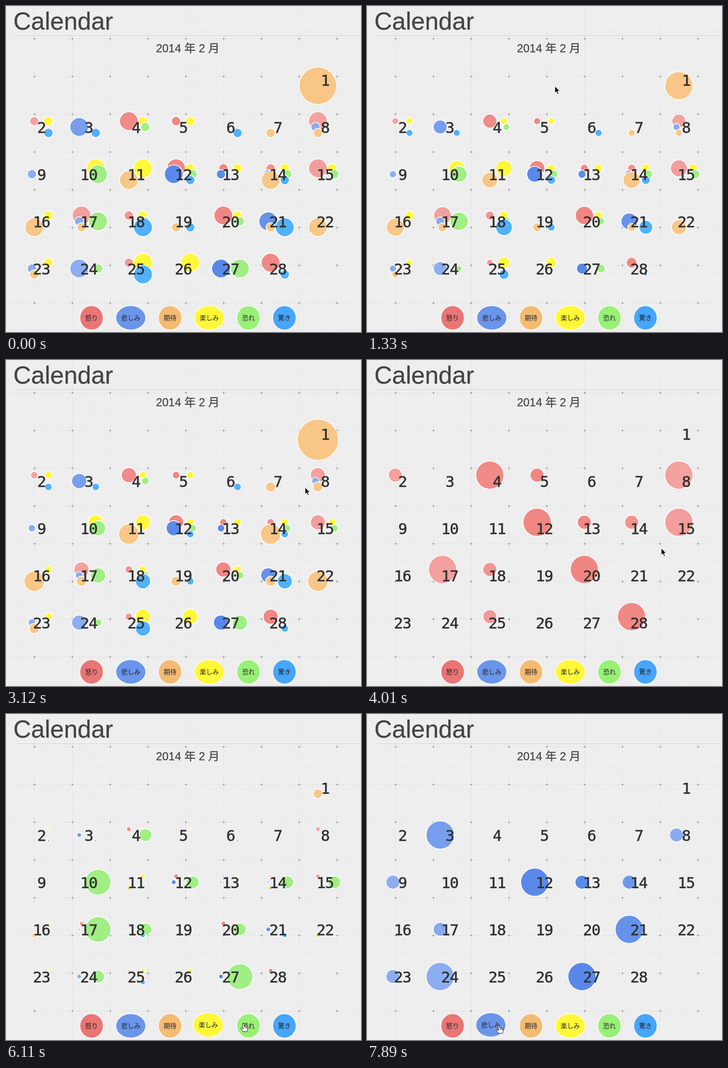
An HTML page for the animation above (8 s loop, 751 px wide and 691 px high).

```html
<!DOCTYPE html>
<html lang="ja">
<head>
<meta charset="utf-8">
<title>Calendar</title>
<style>
html, body { margin: 0; width: 100%; height: 100%; overflow: hidden; background: #fff; }
svg { display: block; }
text { font-family: "Liberation Sans", "Noto Sans CJK JP", "Noto Sans CJK", sans-serif; fill: #444; stroke: #444; stroke-width: .3; }
.mid { text-anchor: middle; }
.day { font: 32px "DejaVu Sans Mono", monospace; letter-spacing: -1.2px; fill: #303030; stroke: #303030; stroke-width: .6; }
.key { font-size: 13.5px; fill: #222; stroke: none; }
</style>
</head>
<body>
<svg width="751" height="691" viewBox="0 0 751 691">
  <defs>
    <pattern id="fine" width="4" height="4" patternUnits="userSpaceOnUse">
      <path d="M.5 0V4M0 1.5H4" stroke="#e9e9e9"/>
    </pattern>
    <pattern id="paper" width="80" height="80" x="60" y="69" patternUnits="userSpaceOnUse">
      <path d="M20.5 0V80M40.5 0V80M60.5 0V80M0 20.5H80M0 40.5H80M0 60.5H80" stroke="#e6e6e6"/>
      <path d="M.5 0V80M0 .5H80" stroke="#dfdfdf"/>
      <path d="M.5 0V3M.5 78V80M0 .5H3M78 .5H80" stroke="#8a8a8a"/>
    </pattern>
    <clipPath id="area"><rect x="35" y="119" width="716" height="500"/></clipPath>
  </defs>
  <g id="page">
    <rect width="751" height="691" fill="#f2f2f2"/>
    <rect width="751" height="691" fill="url(#fine)"/>
    <rect width="751" height="691" fill="url(#paper)"/>
    <text x="15.5" y="50" font-size="52">Calendar</text>
    <path d="M16 63.5H751" stroke="#c8c8c8"/>
    <path d="M16 64.5H751" stroke="#fff"/>
    <text class="mid" x="384.5" y="98" font-size="24">2014 年 2 月</text>
    <g id="dots" clip-path="url(#area)" stroke="#fff" stroke-width="1.6"></g>
    <g id="days"></g>
    <g id="keys"></g>
  </g>
  <g id="cursor">
    <path id="arrow" d="M0 0V14.5L3.4 11.4L5.8 17L8.2 16L5.8 10.6H10.4Z" fill="#000" stroke="#fff"/>
    <path id="hand" d="M-1.5 1Q0 -1 1.5 1L2.5 6Q4 4.5 5 6Q6.5 5 7.5 6.5Q9.5 6 9.7 8.5L9.5 13L8 17H0L-5 10.5Q-5 8 -2.5 9.5L0 11Z M3.2 7V10M5.8 7V10M8 8V10" fill="#fff" stroke="#111" stroke-linejoin="round"/>
  </g>
</svg>
<script>
const $ = id => document.getElementById(id);
function add(parent, tag, attrs, text) {
  const el = document.createElementNS("http://www.w3.org/2000/svg", tag);
  for (const k in attrs) el.setAttribute(k, attrs[k]);
  if (text) el.textContent = text;
  return parent.appendChild(el);
}

// Some dot colours deepen with the tone of the day (0 to 1)
const moods = [
  { id: "a", name: "怒り", key: "#e97575", dot: tone => `hsl(2 78% ${79.5 - 7 * tone}%)` },
  { id: "s", name: "悲しみ", key: "#6b95ea", dot: tone => `hsl(220 76% ${75 - 12 * tone}%)` },
  { id: "o", name: "期待", key: "#f5bb73", dot: () => "#f8c787" },
  { id: "j", name: "楽しみ", key: "#fff738", dot: () => "#fff73a" },
  { id: "f", name: "恐れ", key: "#99f077", dot: () => "#a0ee84" },
  { id: "u", name: "驚き", key: "#47a5fb", dot: () => "#51b1fc" }
];
// One word per day: a capital is a strong mood, a plus doubles it
const month = ("O+ aju Su Ajf aj u o Aso s JF OJ ASjfu asj asOjfu Ajf Oj AsoF ajfU ou Ajf SoU O soj Sf aJU J SF Au").split(" ");

const dots = [];
month.forEach((word, i) => {
  const day = i + 1, cell = i + 6;
  const x = 75 + cell % 7 * 100, y = 157 + Math.floor(cell / 7) * 100;
  const tone = .5 + .5 * Math.cos((day - 5) / 7.4 * 2 * Math.PI);
  for (const [, letter, plus] of word.matchAll(/([a-z])(\+?)/gi)) {
    const id = letter.toLowerCase(), n = moods.findIndex(m => m.id === id);
    const row = n % 3 - 1, side = n < 3 ? -1 : 1;
    const el = add($("dots"), "circle", {
      cx: x + side * (20 - 5 * Math.abs(row)) - .2,
      cy: y + 12.5 * row - .5,
      fill: moods[n].dot(tone)
    });
    dots.push({ el, id, base: (letter === id ? 10 : 20) * (plus ? 2 : 1), queue: day + .75 * n });
  }
  add($("days"), "text", { class: "mid day", x, y: y + 12 }, String(day));
});

let left = 157;
for (const m of moods) {
  const rx = 10 + 7 * m.name.length, x = left + rx;
  m.el = add($("keys"), "g");
  add(m.el, "ellipse", { cx: x, cy: 661, rx: rx + .6, ry: 25.6, fill: m.key, stroke: "#fff", "stroke-width": 1.3 });
  add(m.el, "text", { class: "mid key", x, y: 666 }, m.name);
  left += 2 * rx + 28;
}

const LOOP = 8000, STEP = 148.9, FADE = 300;
const RELOAD = 570, PAINTED = 720;
const ENTER = 771, LAG = 14, GROW = 280, SETTLE = 160;
const KEYS_FROM = 4700;
// When the pointer sets off, the mood it brings up ("" is all), where it goes
const tour = [
  [140, null, 270, 212], [1000, null, 397, 170],
  [1575, "o", 640, 168], [1840, "", 603, 169],
  [2480, "o", 650, 178], [2920, "", 628, 292],
  [3600, "a", 622, 399], [4020, "", 608, 470],
  [4790, "u", 590, 649], [5365, "", 550, 653],
  [5498, "f", 512, 656], [5965, "", 470, 657],
  [6085, "j", 430, 657], [6500, "j", 340, 658],
  [6735, "o", 340, 658], [7380, "s", 278, 660]
];

const clamp = v => Math.max(0, Math.min(1, v));
const ease = v => v < .5 ? 4 * v ** 3 : 1 - 4 * (1 - v) ** 3;

// Moves a value towards the goal of each stop until the next one begins
function glide(value, t, goalOf) {
  tour.forEach((stop, k) => {
    const goal = goalOf(stop);
    if (t < stop[0] || goal === null) return;
    const end = k + 1 < tour.length ? Math.min(t, tour[k + 1][0]) : t;
    value += (goal - value) * ease(clamp((end - stop[0]) / FADE));
  });
  return value;
}

// Grows to full size, then settles at three quarters
const entrance = u => clamp(u / GROW) - .25 * clamp((u - GROW) / SETTLE);

function radius({ id, base, queue }, t) {
  if (t < RELOAD) return base;
  return glide(base * entrance(t - ENTER - LAG * queue), t, ([, mood]) =>
    mood === null ? null : mood === "" ? base : mood === id ? base * 1.5 : 0);
}

function draw(t) {
  const show = (el, on) => el.setAttribute("visibility", on ? "visible" : "hidden");
  $("page").style.display = t >= RELOAD && t < PAINTED ? "none" : "";
  for (const dot of dots) {
    const r = radius(dot, t);
    dot.el.setAttribute("r", Math.max(0, r - .3));
    show(dot.el, r > .4);
  }
  const hover = t > KEYS_FROM ? tour.filter(stop => stop[0] <= t).pop()[1] : "";
  for (const m of moods) m.el.setAttribute("transform", m.id === hover ? "translate(-2 -2)" : "");
  const x = glide(246, t, stop => stop[2]), y = glide(187, t, stop => stop[3]);
  $("cursor").setAttribute("transform", `translate(${x + .5} ${y})`);
  show($("arrow"), t > 120 && !hover);
  show($("hand"), hover);
}

// The screen refreshes in even steps
function frame(now) {
  draw(Math.floor((now % LOOP + 16) / STEP) * STEP - 16);
  requestAnimationFrame(frame);
}
draw(0);
requestAnimationFrame(frame);
</script>
</body>
</html>
```
